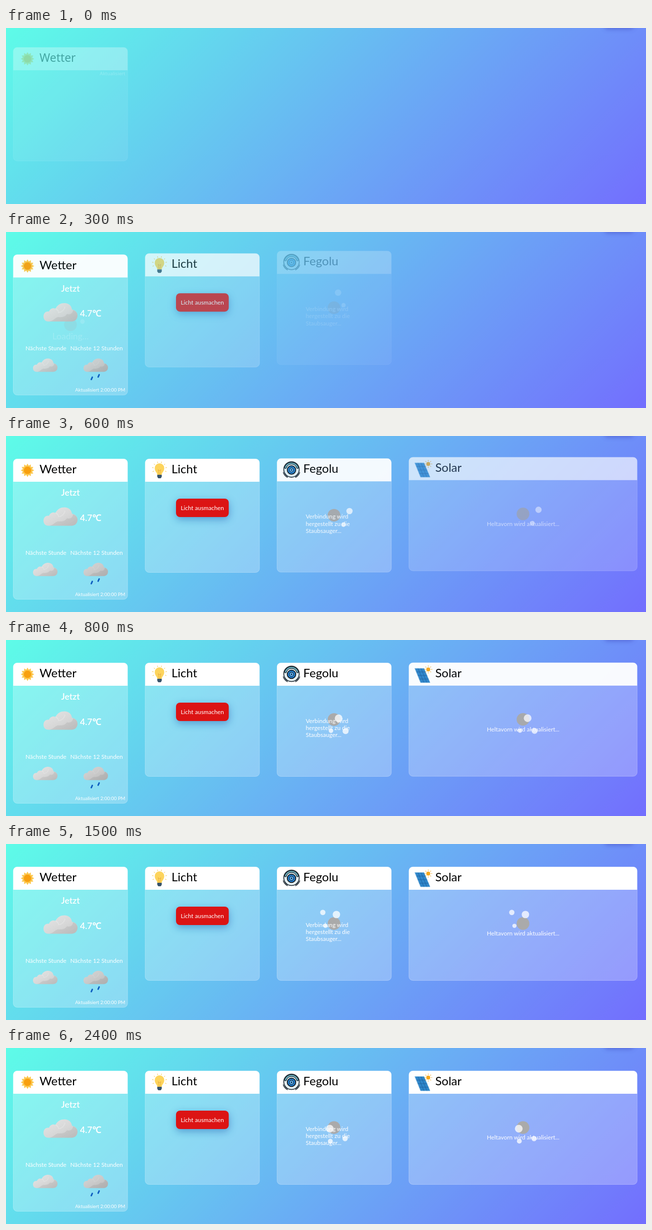
An HTML page for the animation above (2500 ms loop, 1280x354 px).

```html
<!DOCTYPE html>
<html lang="de">
<head>
<meta charset="utf-8">
<title>Dashboard</title>
<style>
html, body { margin: 0; width: 100%; height: 100%; overflow: hidden; }
svg { display: block; width: 100vw; height: 100vh; font-family: Lato, sans-serif; }
.title { font-size: 24px; fill: #000; }
.big { font-size: 17.6px; font-weight: 600; fill: #fff; }
.text { font-size: 11.8px; fill: #fff; }
.small { font-size: 9.6px; fill: #fff; }
</style>
</head>
<body>
<svg id="stage" viewBox="0 0 1280 354" preserveAspectRatio="none">
  <defs>
    <linearGradient id="sky" gradientUnits="userSpaceOnUse" x1="231.5" y1="-231.5" x2="1048.5" y2="585.5">
      <stop offset="0" stop-color="#5efce8"/><stop offset="1" stop-color="#736efe"/>
    </linearGradient>
    <linearGradient id="grey" x1="0" y1="0" x2="1" y2="1">
      <stop offset="0" stop-color="#e6e6e6"/><stop offset=".6" stop-color="#d6d6d6"/><stop offset="1" stop-color="#c4c4c4"/>
    </linearGradient>
    <filter id="blur" x="-50%" y="-100%" width="200%" height="300%"><feGaussianBlur stdDeviation="5"/></filter>
    <filter id="glow" x="-50%" y="-100%" width="200%" height="300%"><feGaussianBlur stdDeviation="8"/></filter>
    <g id="cloud">
      <path d="M10 37C3 37 0 32 0 27C0 20 5 16 11 17C13 11 19 9 24 11C28 3 35 0 42 0C50 0 56 5 57 13C64 14 68 19 68 25C68 32 63 37 56 37Z" fill="url(#grey)"/>
      <path d="M12 37C20 36 23 29 29 28C37 29 43 28 47 22C54 24 59 20 59 14C65 16 68 20 68 25C68 32 63 37 56 37Z" fill="#9a9a9a" opacity=".25"/>
      <path d="M24 11C28 13 30 16 30 19C38 18 42 12 43 7" fill="none" stroke="#fff" stroke-width="2" opacity=".2"/>
    </g>
  </defs>
  <rect width="1280" height="354" fill="url(#sky)"/>
  <rect x="1196" y="-30" width="60" height="32" rx="8" fill="#3b3fb8" opacity=".5" filter="url(#blur)"/>
  <g id="cards"></g>
</svg>
<script>
const LOOP = 2500, STEP = 100;
const $ = id => document.getElementById(id);
const rad = deg => deg * Math.PI / 180;
const range = n => [...Array(n).keys()];
const circle = (x, y, r, fill, more = '') => `<circle cx="${x}" cy="${y}" r="${r}" fill="${fill}" ${more}/>`;
const text = (cls, x, y, s, more = '') => `<text class="${cls}" x="${x}" y="${y}" ${more}>${s}</text>`;
const line = (d, color, w, more = '') => `<path d="${d}" fill="none" stroke="${color}" stroke-width="${w}" stroke-linecap="round" ${more}/>`;

const polar = (x, y, r, a) => `${(x + r * Math.cos(a)).toFixed(2)} ${(y + r * Math.sin(a)).toFixed(2)}`;
const star = (x, y, n, r1, r2) =>
  `M${range(2 * n).map(i => polar(x, y, i % 2 ? r1 : r2, i * Math.PI / n)).join('L')}Z`;
const rays = (x, y, n, r1, r2, from = 0, span = 360) => range(n).map(i => {
  const a = rad(from + i * span / n);
  return `M${polar(x, y, r1, a)}L${polar(x, y, r2, a)}`;
}).join('');

const sunIcon = `<path d="${star(43, 69, 12, 9.5, 13.5)}" fill="#fcc850"/>` +
  circle(43, 69, 7.5, '#f8a010');

const bulbIcon = line(rays(307, 66, 8, 12.5, 14.5, 157.5, 257), '#f5c542', 1) +
  `<path d="M302.5 78C302.500 73.500 297.500 71.500 297.500 64.500A9.500 9.500 0 0 1 316.500 64.500C316.500 71.500 311.500 73.500 311.500 78Z" fill="#fdd45c"/>` +
  line('M304.500 68l1.500 9M309.500 68l-1.500 9M304.500 68l2.500 2l2.500-2', '#e9a93a', .9) +
  `<path d="M302.500 78h9v4l-2 3h-5l-2-3Z" fill="#37536a"/>`;

const robotIcon = circle(571, 68, 15.5, '#e4eef0', 'stroke="#16222c" stroke-width="1.6"') +
  line('M559 64A12.600 12.600 0 0 1 583 64', '#16222c', 5) +
  line('M559 64A12.600 12.600 0 0 1 583 64', '#6fb3c0', 2.4) +
  circle(571, 69, 8.3, '#2489e0', 'stroke="#111d28" stroke-width="2"') +
  circle(571, 69, 4.3, '#63b4f5', 'stroke="#111d28" stroke-width="1.200"') +
  circle(571, 69, 1.4, '#111d28') +
  line('M554.500 74A17.500 17.500 0 0 0 563 84M587.500 74A17.500 17.500 0 0 1 579 84M557.500 76A15 15 0 0 0 563 82M584.500 76A15 15 0 0 1 579 82', '#16222c', 1.4);

const solarIcon = `<path d="M818 57.500H836L848 86H829.500Z" fill="#2f86c9"/>` +
  line('M824 57.500L835.700 86M830 57.500L841.800 86M820.900 64.600H839M823.700 71.700H842M826.600 78.800H845', '#1d5f9c', .8) +
  line('M818 57.500H836L848 86H829.500Z', '#5ea5d8', .8) +
  circle(844.500, 59.500, 4, '#f8a81c') + line(rays(844.5, 59.5, 8, 6, 7.6), '#f0b64a', 1.1);

const spinner = (id, x, y) =>
  `<g id="${id}" transform="translate(${x} ${y})"><g class="back"></g>${circle(0, 0, 12.7, '#aaa')}<g class="front"></g></g>`;
const cloud = (x, y, s) => `<use href="#cloud" transform="translate(${x} ${y}) scale(${s})"/>`;

const weather = `
  <g id="waiting">${text('small', 238.5, 102, 'Aktualisiert', 'text-anchor="end"')}</g>
  <g id="loading">${spinner('spin0', 129, 187)}${text('big', 129, 216, 'Loading...', 'text-anchor="middle" style="font-weight:400"')}</g>
  <g id="loaded">
    ${text('big', 129, 120, 'Jetzt', 'text-anchor="middle"')}
    ${text('big', 148, 170.5, '4.7℃')}
    ${text('text', 39, 238.500, 'Nächste Stunde')}
    ${text('text', 128.500, 238.500, 'Nächste 12 Stunden')}
    ${text('small', 238.500, 321.500, 'Aktualisiert 2:00:00 PM', 'text-anchor="end"')}
    <g id="clouds">${cloud(75, 143.500, 1)}${cloud(54, 255, .72)}
      <g style="filter:brightness(.93)">${cloud(155, 255, .72)}</g>
      ${line('M172.600 292.500l-2 4.500M186.300 287.500l-2 4.500', '#0d5dc0', 3)}
    </g>
  </g>`;

const light = `
  <rect x="340" y="131" width="106" height="37" rx="8" fill="#1c62b0" opacity=".5" filter="url(#glow)"/>
  <rect x="340" y="126" width="105.500" height="37" rx="8" fill="#dc1414"/>
  ${text('text', 392.700, 149, 'Licht ausmachen', 'text-anchor="middle"')}`;

const robot = spinner('spin2', 656, 160) +
  ['Verbindung wird', 'hergestellt zu die', 'Staubsauger...'].map((s, i) => text('text', 599.5, 167 + 14.2 * i, s)).join('');

const solar = spinner('spin3', 1034, 160) +
  text('text', 1034.3, 184, 'Heltavorn wird aktualisiert...', 'text-anchor="middle"');

const cards = [
  [14.5, 228.7, 'Wetter', sunIcon, weather],
  [278.3, 228.7, 'Licht', bulbIcon, light],
  [542, 228.7, 'Fegolu', robotIcon, robot],
  [805.8, 456.5, 'Solar', solarIcon, solar]
];
$('cards').innerHTML = cards.map(([x, w, title, icon, body], i) => `<g id="card${i}">
  <rect id="body${i}" x="${x}" y="46" width="${w}" height="228.500" rx="8" fill="#fff" fill-opacity=".25" stroke="#fff" stroke-opacity=".28"/>
  <path d="M${x} 92V54a8 8 0 0 1 8-8h${w - 16}a8 8 0 0 1 8 8V92Z" fill="#fff"/>
  ${icon}${text('title', x + 52.6, 75, title)}${body}</g>`).join('');

// cubic-bezier(.3, .1, .35, 1), solved by bisection
function ease(x) {
  if (x <= 0) return 0;
  if (x >= 1) return 1;
  const curve = (s, a, b) => 3 * (1 - s) ** 2 * s * a + 3 * (1 - s) * s * s * b + s ** 3;
  let lo = 0, hi = 1;
  for (let i = 0; i < 24; i++) {
    const mid = (lo + hi) / 2;
    if (curve(mid, .3, .35) < x) lo = mid; else hi = mid;
  }
  return curve(lo, .1, 1);
}

// Linear track through [time, value] points, extended past both ends
function track(points, t) {
  let i = 1;
  while (i < points.length - 1 && t > points[i][0]) i++;
  const [t0, a] = points[i - 1], [t1, b] = points[i];
  return a + (b - a) * (t - t0) / (t1 - t0);
}

// Three edge-on orbits: tilt of the line, angle over time
const orbits = [
  { tilt: 45, keys: [[400, 155], [600, 108], [800, 66], [1500, -86], [2400, -272]] },
  { tilt: -75, keys: [[400, 92], [600, 166], [800, 241], [1500, 385], [2400, 618]] },
  { tilt: -15, keys: [[400, 106], [600, 59], [800, 12], [1500, -135], [1800, -238], [2400, -371]] }
];

function drawSpinner(id, angles) {
  const parts = { back: '', front: '' };
  angles.forEach((deg, i) => {
    const a = rad(deg), tilt = rad(orbits[i].tilt);
    const k = 1 / (1 - Math.cos(a) / 3), s = 31 * Math.sin(a) * k;
    parts[Math.cos(a) < 0 ? 'back' : 'front'] +=
      circle(s * Math.cos(tilt), s * Math.sin(tilt), 5.2 * k, '#fff', 'opacity=".75"');
  });
  for (const side in parts) $(id).querySelector('.' + side).innerHTML = parts[side];
}

const show = (id, on) => $(id).setAttribute('opacity', +on);

function render(t) {
  cards.forEach((_, i) => {
    const p = ease((t + 142 - 161 * i) / 580);
    $('card' + i).setAttribute('opacity', p);
    $('card' + i).setAttribute('transform', `translate(0 ${-10 * (1 - p)})`);
  });
  const ready = t >= 100;
  $('stage').style.fontFamily = ready ? 'Lato, sans-serif' : '"Noto Sans", sans-serif';
  document.querySelector('.title').style.fontSize = ready ? '24px' : '22.8px';
  $('body0').setAttribute('height', ready ? 282.5 : 228.5);
  show('waiting', !ready);
  show('loaded', ready);
  show('clouds', t >= 300);
  show('loading', ready ? Math.max(0, Math.min(.4, .33 - (t - 200) * .0014)) : 0);

  drawSpinner('spin0', [-33, 95, 138].map((a, i) => a + (t - 200) * (i === 1 ? .235 : -.235)));
  const angles = orbits.map(o => track(o.keys, t));
  drawSpinner('spin2', angles);
  drawSpinner('spin3', angles);
}

const start = performance.now();
function tick() {
  const t = (performance.now() - start) % LOOP;
  render(Math.floor(t / STEP) * STEP);
  requestAnimationFrame(tick);
}
tick();
</script>
</body>
</html>
```
